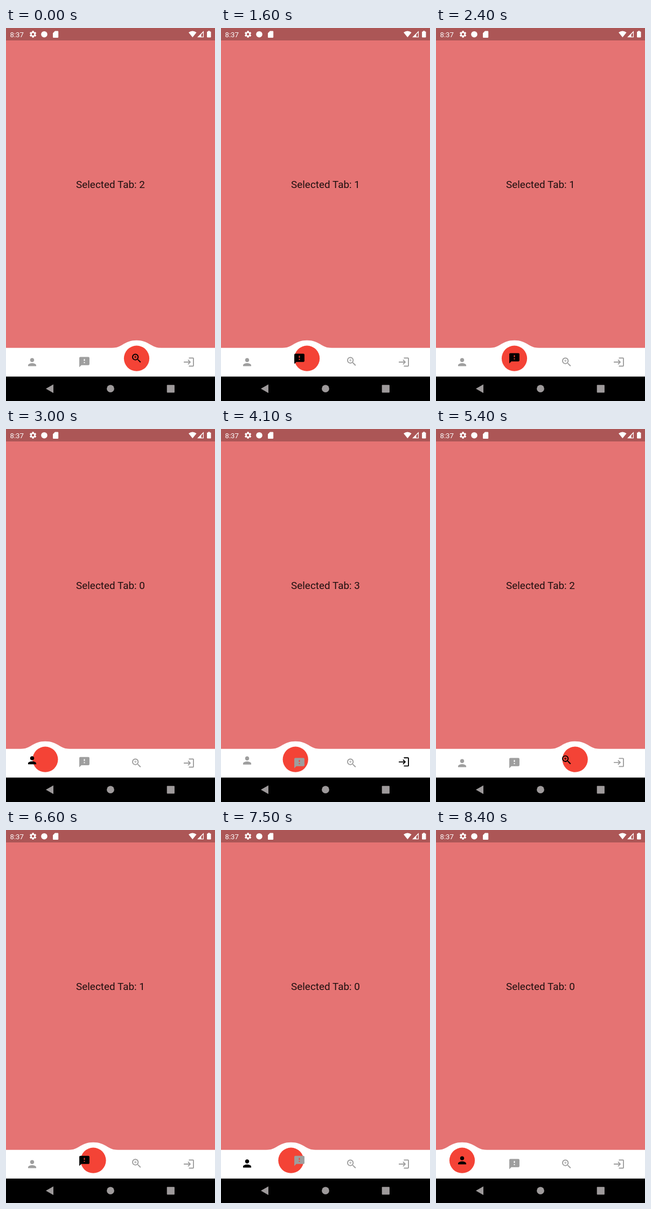
Write an HTML page that moves like this. It is 388 px wide and 690 px high and loops after 8500 ms.

```html
<!DOCTYPE html>
<html lang="en">
<head>
<meta charset="utf-8">
<title>Tab bar</title>
<style>
  html, body { margin: 0; width: 100%; height: 100%; overflow: hidden; background: #e57373; }
  svg { display: block; width: 388px; height: 690px; font-family: Roboto, sans-serif; }
</style>
</head>
<body>
<svg viewBox="0 0 388 690">
  <rect width="388" height="690" fill="#e57373"/>
  <rect width="388" height="23" fill="#ac5656"/>

  <g fill="#fff">
    <text x="7.5" y="16.5" font-size="13.2">8:37</text>
    <path transform="translate(42.3 3.8) scale(.65)" d="M19.14 12.94c.04-.3.06-.61.06-.94s-.02-.64-.07-.94l2.03-1.58c.18-.14.23-.41.12-.61l-1.92-3.32c-.12-.22-.37-.29-.59-.22l-2.39.96c-.5-.38-1.03-.7-1.62-.94l-.36-2.54c-.04-.24-.24-.41-.48-.41h-3.84c-.24 0-.43.17-.47.41l-.36 2.54c-.59.24-1.13.57-1.62.94l-2.39-.96c-.22-.08-.47 0-.59.22L2.74 8.87c-.12.21-.08.47.12.61l2.03 1.58c-.05.3-.09.63-.09.94s.02.64.07.94l-2.03 1.58c-.18.14-.23.41-.12.61l1.92 3.32c.12.22.37.29.59.22l2.39-.96c.5.38 1.03.7 1.62.94l.36 2.54c.05.24.24.41.48.41h3.84c.24 0 .44-.17.47-.41l.36-2.54c.59-.24 1.13-.56 1.62-.94l2.39.96c.22.08.47 0 .59-.22l1.92-3.32c.12-.22.07-.47-.12-.61zM12 15.6a3.6 3.6 0 1 1 0-7.2 3.6 3.6 0 0 1 0 7.2z"/>
    <circle cx="71" cy="11.7" r="5.8"/>
    <path d="M91 5.5h5a1.2 1.2 0 0 1 1.2 1.2v10a1.2 1.2 0 0 1-1.2 1.2h-7.8a1.2 1.2 0 0 1-1.2-1.2V9.5z"/>
    <path d="M339 8.2Q346.3 2.8 353.6 8.2L346.3 17.3z"/>
    <path fill-rule="evenodd" d="M355 17.3L367 5.3V17.3zM362.5 16.1H365.8V8.4L362.5 11.7z"/>
    <path d="M375.3 5.3h3v1.3h1.4a.8.8 0 0 1 .8.8v9.2a.8.8 0 0 1-.8.8h-5.8a.8.8 0 0 1-.8-.8V7.4a.8.8 0 0 1 .8-.8h1.4z"/>
  </g>

  <text id="label" x="194" y="296" font-size="18.9" text-anchor="middle" fill="#000" fill-opacity=".87"></text>

  <rect y="591.7" width="388" height="54" fill="#fff"/>
  <g id="bump">
    <path fill="#fff" d="M-46 592C-27 592-23 577.8 0 577.8S27 592 46 592z"/>
    <circle cy="611.2" r="23.6" fill="#f44336"/>
  </g>
  <g id="icons" fill-rule="evenodd"></g>

  <rect y="644.8" width="388" height="45.2"/>
  <g fill="#9e9a9b">
    <path d="M74 667.2L88 659.2V675.2z"/>
    <circle cx="194" cy="667.2" r="6.9"/>
    <rect x="298.7" y="660.2" width="14.2" height="14.2" rx="1"/>
  </g>
</svg>
<script>
const LOOP = 8500, STEP = 100, MOVE = 500, REST_Y = 618, LIFT = 7;
// [tap time, tab]
const taps = [[-MOVE, 2], [1260, 1], [2719, 0], [4000, 3], [5070, 2], [6275, 1], [7450, 0]];
const shapes = [
  'M12 12c2.21 0 4-1.79 4-4s-1.79-4-4-4-4 1.79-4 4 1.79 4 4 4zm0 2c-2.67 0-8 1.34-8 4v2h16v-2c0-2.66-5.33-4-8-4z',
  'M20 2H4c-1.1 0-2 .9-2 2v18l4-4h14c1.1 0 2-.9 2-2V4c0-1.1-.9-2-2-2zm-7 12h-2v-2h2v2zm0-4h-2V6h2v4z',
  'M15.5 14h-.79l-.28-.27A6.47 6.47 0 0 0 16 9.5 6.5 6.5 0 1 0 9.5 16c1.61 0 3.09-.59 4.23-1.57l.27.28v.79l5 4.99L20.49 19zm-6 0a4.5 4.5 0 1 1 0-9 4.5 4.5 0 0 1 0 9zM12 10h-2v2H9v-2H7V9h2V7h1v2h2z',
  'M11 7L9.6 8.4l2.6 2.6H2v2h10.2l-2.6 2.6L11 17l5-5zM20 19h-8v2h8c1.1 0 2-.9 2-2V5c0-1.1-.9-2-2-2h-8v2h8z'
];
const byId = id => document.getElementById(id);
const label = byId('label'), bump = byId('bump');
const tabX = i => 48.5 + 97 * i;

const icons = shapes.map(d => {
  const path = document.createElementNS('http://www.w3.org/2000/svg', 'path');
  path.setAttribute('d', d);
  return byId('icons').appendChild(path);
});

// cubic-bezier(0, 0, .58, 1)
function easeOut(x) {
  if (x >= 1) return 1;
  let lo = 0, hi = 1;
  for (let i = 0; i < 20; i++) {
    const s = (lo + hi) / 2;
    if (s * s * (1.74 * (1 - s) + s) < x) lo = s; else hi = s;
  }
  return lo * lo * (3 - 2 * lo);
}

function draw(t) {
  const n = taps.findLastIndex(tap => tap[0] <= t);
  const [start, tab] = taps[n];
  const from = n ? taps[n - 1][1] : tab;
  const p = easeOut((t - start) / MOVE);

  label.textContent = 'Selected Tab: ' + tab;
  bump.setAttribute('transform', `translate(${tabX(from) + (tabX(tab) - tabX(from)) * p} 0)`);
  icons.forEach((icon, i) => {
    const lift = i === tab ? p : i === from ? 1 - p : 0;
    icon.setAttribute('transform',
      `translate(${tabX(i)} ${REST_Y - LIFT * lift}) scale(.943) translate(-12 -12)`);
    icon.setAttribute('fill', i === tab ? '#000' : '#9e9e9e');
  });
}

const begin = performance.now();
function tick() {
  const t = (performance.now() - begin) % LOOP;
  draw(Math.floor(t / STEP) * STEP);
  requestAnimationFrame(tick);
}
tick();
</script>
</body>
</html>
```
